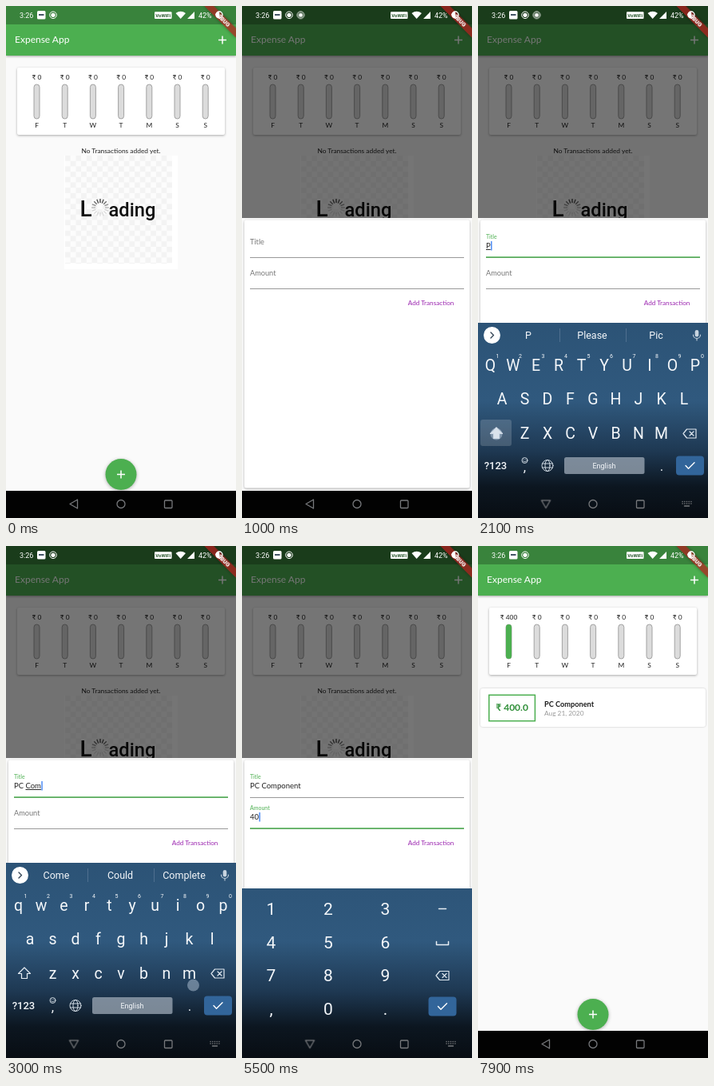
Write an HTML page that moves like this. It is 288 px wide and 640 px high and loops after 8 s.

```html
<!DOCTYPE html>
<html lang="en">
<head>
<meta charset="utf-8">
<title>Expense App</title>
<style>
  html, body { margin: 0; width: 100%; height: 100%; overflow: hidden; background: #000; }
  svg { display: block; width: 288px; height: 640px; font-family: Lato, "Open Sans", sans-serif; }
  text { white-space: pre; }
  .mid { text-anchor: middle; }
  .sys { font-family: Roboto, "Noto Sans", sans-serif; }
  .line { fill: none; stroke-linecap: round; stroke-linejoin: round; }
  .card { fill: #fff; filter: drop-shadow(0 1px 1.5px rgba(0,0,0,.32)); }
  .flat { filter: drop-shadow(0 .6px .8px rgba(0,0,0,.22)); }
  .small { font-size: 8.4px; fill: #222; }
  .input { font-size: 9.5px; fill: #222; }
  .label { font-size: 9.2px; fill: #777; }
  .upper .letter { text-transform: uppercase; }
  #word { text-decoration: underline #aaa .6px; }

  #scrim, #sheet, #empty, #filled, #alpha, #digits, #back, #imeIcon, #second,
  .label, .focus { animation: 8s linear infinite; }

  #scrim { animation-name: scrim; }
  @keyframes scrim {
    0%, 4.375% { opacity: 0; animation-timing-function: ease; }
    7.5%, 79.375% { opacity: .54; }
    82%, 100% { opacity: 0; }
  }
  #sheet { animation-name: sheet; }
  @keyframes sheet {
    0%, 4.375% { transform: translateY(341px); animation-timing-function: cubic-bezier(0,0,.2,1); }
    7.5%, 79.375% { transform: none; animation-timing-function: cubic-bezier(.8,0,1,1); }
    82%, 100% { transform: translateY(341px); }
  }
  #empty { animation-name: before; }
  @keyframes before { 0%, 79.37% { opacity: 1; } 79.375%, 100% { opacity: 0; } }
  #filled { animation-name: after; }
  @keyframes after { 0%, 79.37% { opacity: 0; } 79.375%, 100% { opacity: 1; } }
  #second { animation-name: second; }
  @keyframes second {
    0%, 9.99% { opacity: 0; }
    10%, 36.99% { opacity: 1; }
    37%, 100% { opacity: 0; }
  }
  #alpha { animation-name: alpha; }
  @keyframes alpha {
    0%, 17.5% { transform: translateY(244px); animation-timing-function: cubic-bezier(0,0,.2,1); }
    20.625%, 54.49% { transform: none; }
    54.5%, 100% { transform: translateY(244px); }
  }
  #digits { animation-name: digits, fade; }
  @keyframes digits {
    0%, 54.49% { transform: translateY(244px); }
    54.5%, 82.22% { transform: none; animation-timing-function: cubic-bezier(.4,0,1,1); }
    85.25%, 100% { transform: translateY(244px); }
  }
  @keyframes fade {
    0%, 82.05% { opacity: 1; }
    82.45% { opacity: .93; }
    85.25%, 100% { opacity: .6; }
  }
  #back { animation-name: turn; transform-origin: 85px 622.5px; }
  @keyframes turn {
    0%, 17.5% { transform: none; }
    19.75%, 82% { transform: rotate(-90deg); }
    82.9%, 100% { transform: none; }
  }
  #imeIcon { animation-name: ime; }
  @keyframes ime {
    0%, 17.5% { opacity: 0; }
    19.75%, 82% { opacity: 1; }
    82.4%, 100% { opacity: 0; }
  }
  #titleLabel { animation-name: titleLabel; transform-origin: 10px 298px; }
  @keyframes titleLabel {
    0%, 16.25% { transform: none; fill: #777; }
    18.75%, 100% { transform: translateY(-7px) scale(.76); fill: #4caf50; }
  }
  #amountLabel { animation-name: amountLabel; transform-origin: 10px 337px; }
  @keyframes amountLabel {
    0%, 52.875% { transform: none; fill: #777; }
    55.375%, 100% { transform: translateY(-7px) scale(.76); fill: #4caf50; }
  }
  #titleFocus { animation-name: titleFocus; }
  @keyframes titleFocus {
    0%, 16.25% { opacity: 0; }
    18.75%, 52.875% { opacity: 1; }
    55.375%, 100% { opacity: 0; }
  }
  #amountFocus { animation-name: amountFocus; }
  @keyframes amountFocus {
    0%, 52.875% { opacity: 0; }
    55.375%, 100% { opacity: 1; }
  }
</style>
</head>
<body>
<svg viewBox="0 0 288 640">
  <defs>
    <linearGradient id="keys" gradientUnits="userSpaceOnUse" x1="0" y1="396" x2="0" y2="640">
      <stop offset="0" stop-color="#2c5376"/>
      <stop offset=".4" stop-color="#30597e"/>
      <stop offset=".66" stop-color="#1e3852"/>
      <stop offset=".84" stop-color="#0c1620"/>
      <stop offset="1" stop-color="#080d13"/>
    </linearGradient>
    <pattern id="checks" x="74" y="187" width="13.4" height="13.4" patternUnits="userSpaceOnUse">
      <rect width="13.4" height="13.4" fill="#fcfcfc"/>
      <path d="M0 0h6.7v13.4h6.7v-6.7h-13.4z" fill="#f3f3f3"/>
    </pattern>
    <g id="erase" class="line" stroke="#dfe8f0" stroke-width="1.2">
      <path d="M-8 0L-3.5 -5.5H8V5.5H-3.5ZM0 -2.5L5 2.5M5 -2.5L0 2.5"/>
    </g>
    <g id="enter">
      <rect x="-17.5" y="-12" width="35" height="24" rx="4" fill="#32659a"/>
      <path class="line" d="M-5.5 0L-2 3.7L5.5 -3.7" stroke="#fff" stroke-width="1.4"/>
    </g>
    <g id="record">
      <circle r="4.3" fill="none" stroke="#fff"/>
      <circle r="2.6" fill="#fff"/>
    </g>
  </defs>

  <rect width="288" height="640" fill="#fafafa"/>
  <rect width="288" height="62" fill="#4caf50" style="filter:drop-shadow(0 1px 1.5px rgba(0,0,0,.35))"/>
  <rect width="288" height="23" fill="#39833c"/>
  <text x="11" y="46" font-size="12" fill="#fff">Expense App</text>
  <path d="M266 42.5h10M271 37.5v10" stroke="#fff" stroke-width="1.5"/>

  <rect class="card" x="14" y="77" width="260" height="84" rx="2"/>
  <g id="days"></g>

  <g id="empty">
    <text class="small mid" x="38.5" y="92">₹ 0</text>
    <text class="small mid" x="144" y="184">No Transactions added yet.</text>
    <rect x="73" y="187" width="142" height="142" fill="#fff"/>
    <rect x="74" y="187" width="134" height="135" fill="url(#checks)"/>
    <g class="sys" font-weight="500" fill="#111">
      <text x="92.5" y="263" font-size="28">L</text>
      <text x="128.5" y="263" font-size="23.7">ading</text>
    </g>
    <g id="spinner" stroke="#222" stroke-width="1.3"></g>
  </g>

  <g id="filled">
    <rect x="35" y="98" width="7" height="43" rx="3.5" fill="#4caf50"/>
    <text class="small mid" x="38.5" y="92">₹ 400</text>
    <rect class="card flat" x="3" y="178" width="282" height="48" rx="3"/>
    <rect x="13.8" y="186.3" width="57.6" height="32.4" fill="none" stroke="#4caf50" stroke-width="1.5"/>
    <text class="mid" x="42.6" y="206" font-size="12" font-weight="700" fill="#2f8f38">₹ 400.0</text>
    <text x="83" y="201" font-size="9.2" font-weight="700" fill="#1c1c1c">PC Component</text>
    <text x="83" y="212" font-size="8.3" fill="#999">Aug 21, 2020</text>
  </g>

  <circle cx="144" cy="585.5" r="19.5" fill="#4caf50" style="filter:drop-shadow(0 1.5px 2px rgba(0,0,0,.3))"/>
  <path d="M139 585.5h10M144 580.5v10" stroke="#fff" stroke-width="1.5"/>

  <rect id="scrim" width="288" height="606"/>

  <g id="sheet">
    <rect y="265" width="288" height="341" fill="#fafafa"/>
    <rect class="card" x="3" y="267.5" width="282" height="335" rx="2.5"/>
    <path d="M10 314.5h268M10 353.5h268" stroke="#999"/>
    <path id="titleFocus" class="focus" d="M10 314h268" stroke="#4caf50" stroke-width="1.6"/>
    <path id="amountFocus" class="focus" d="M10 353h268" stroke="#4caf50" stroke-width="1.6"/>
    <text id="titleLabel" class="label" x="10" y="298">Title</text>
    <text id="amountLabel" class="label" x="10" y="337">Amount</text>
    <text id="title" class="input" x="10" y="303"><tspan id="done"></tspan><tspan id="word"></tspan></text>
    <text id="amount" class="input" x="10" y="342"></text>
    <rect id="caret" width="1.4" height="11.5" fill="#4285f4"/>
    <text x="207.7" y="374" font-size="8.2" fill="#9c27b0">Add Transaction</text>
  </g>

  <g transform="translate(288) rotate(45)">
    <rect x="-28" y="19.6" width="56" height="8.4" fill="#b71c1c" opacity=".7" style="filter:drop-shadow(0 0 2px rgba(0,0,0,.5))"/>
    <text class="mid sys" y="26.3" font-size="7.1" font-weight="900" fill="#fff">DEBUG</text>
  </g>

  <g class="sys" fill="#fff" font-size="9">
    <text x="17" y="14.5">3:26</text>
    <rect x="39" y="6" width="10.5" height="10.5" rx="1.5"/>
    <path d="M41 11h6.5" stroke="#456" stroke-width="2"/>
    <use href="#record" x="59" y="11.3"/>
    <use id="second" href="#record" x="73.5" y="11.3"/>
    <rect x="186" y="7.2" width="21.5" height="8.8" rx="1"/>
    <text class="mid" x="196.7" y="13.7" font-size="6" font-weight="700" fill="#2c5b30">VoWiFi</text>
    <path d="M212.5 9Q218.7 4.5 225 9L218.7 16ZM227 16L236 7V16Z"/>
    <text x="241" y="14.5">42%</text>
    <circle cx="267" cy="11" r="4" fill="none" stroke="#fff" stroke-width="1.4"/>
    <path d="M267 7a4 4 0 0 0 0 8z"/>
  </g>

  <rect y="606" width="288" height="34" fill="#020202"/>

  <g id="alpha" class="sys" fill="#f4f7fa">
    <rect y="396" width="288" height="244" fill="url(#keys)"/>
    <circle cx="17.5" cy="411.5" r="10.5" fill="#fff"/>
    <path class="line" d="M16 408l3.5 3.5l-3.5 3.5" stroke="#345" stroke-width="1.4"/>
    <path d="M102.5 403v17M185.5 403v17" stroke="#587796" stroke-width=".8"/>
    <g id="hints"></g>
    <rect x="271.7" y="405" width="4.6" height="8.5" rx="2.3" fill="#c8d4e0"/>
    <path class="line" d="M269.5 411a4.5 4.5 0 0 0 9 0M274 415.5v2.5" stroke="#c8d4e0" stroke-width="1.1"/>
    <g id="letters"></g>
    <rect id="shiftBack" x="3" y="517" width="39" height="33" rx="3" fill="#fff" opacity=".17"/>
    <path id="shift" class="line" d="M23 527l7.5 7.5h-4v6h-7v-6h-4z" stroke="#e6edf4" stroke-width="1.2"/>
    <use href="#erase" x="265" y="534.5"/>
    <text class="mid" x="22" y="579" font-size="13" font-weight="500">?123</text>
    <text class="mid" x="58.5" y="582" font-size="17">,</text>
    <g class="line" stroke="#dfe8f0" stroke-width=".9">
      <circle cx="58.5" cy="568" r="3.5"/>
      <path d="M56.7 569q1.8 2 3.6 0M57.3 566.7h.1M59.7 566.7h.1"/>
      <circle cx="87" cy="574.5" r="7"/>
      <ellipse cx="87" cy="574.5" rx="3" ry="7"/>
      <path d="M80.7 572h12.6M80.7 577h12.6"/>
    </g>
    <rect x="108" y="564" width="100.5" height="21" rx="2.5" fill="#95a2b0" opacity=".8"/>
    <text class="mid" x="158" y="578" font-size="9">English</text>
    <text class="mid" x="230" y="581" font-size="17">.</text>
    <use href="#enter" x="265.5" y="574.5"/>
  </g>

  <g id="digits" class="sys" fill="#f4f7fa">
    <rect y="428" width="288" height="212" fill="url(#keys)"/>
    <g id="pad" font-size="21"></g>
    <path class="line" d="M246.5 453.5h9M243.5 494.5v4h15v-4" stroke="#e6edf4" stroke-width="1.5"/>
    <use href="#erase" x="251" y="537"/>
    <use href="#enter" x="251" y="575.5"/>
  </g>

  <g class="line" stroke="#77797c" stroke-width="1.3">
    <path id="back" d="M80 622.5l9.5 -5.5v11z"/>
    <circle cx="144" cy="622.5" r="5"/>
    <rect x="198.5" y="618" width="9.5" height="9.5" rx="1"/>
    <g id="imeIcon" stroke-width="1.4">
      <path d="M256 619.5h11M256 622h11" stroke-dasharray=".2 2.5"/>
      <path d="M258.5 625h6"/>
    </g>
  </g>
  <circle id="touch" r="7.5" fill="#b4c6d8" opacity=".5"/>
</svg>
<script>
  const $ = id => document.getElementById(id);
  const add = (parent, tag, attrs, text = '') => {
    const el = document.createElementNS('http://www.w3.org/2000/svg', tag);
    for (const name in attrs) el.setAttribute(name, attrs[name]);
    el.textContent = text;
    return parent.appendChild(el);
  };

  [...'FTWTMSS'].forEach((day, i) => {
    const x = 38.5 + 35.2 * i;
    add($('days'), 'rect', { x: x - 3.5, y: 98, width: 7, height: 43, rx: 3.5, fill: '#dcdcdc', stroke: '#9a9a9a', 'stroke-width': .9 });
    add($('days'), 'text', { class: 'small mid', x, y: 152 }, day);
    if (i) add($('days'), 'text', { class: 'small mid', x, y: 92 }, '₹ 0');
  });

  for (let deg = 0; deg < 360; deg += 22.5) {
    const shade = (1 + Math.cos(deg * Math.PI / 180)) / 2;
    add($('spinner'), 'path', { d: 'M0 -6v-5', transform: `translate(118 252) rotate(${deg})`, opacity: .12 + .75 * shade ** 2 });
  }

  const spots = { '^': [23, 535], ' ': [158, 575] };
  const rows = [['qwertyuiop', 15.5, 448.5], ['asdfghjkl', 30, 491], ['zxcvbnm', 58.5, 534]];
  rows.forEach(([row, left, y], r) => [...row].forEach((key, i) => {
    const x = left + 28.5 * i;
    spots[key] = [x + 5, y + 15];
    add($('letters'), 'text', { class: 'letter mid', x, y: y + 7, 'font-size': 19.5 }, key);
    if (!r) add($('letters'), 'text', { class: 'mid', x: x + 9, y: 440, 'font-size': 7 }, (i + 1) % 10);
  }));

  ['123', '456', '789', ',0.'].forEach((row, r) => [...row].forEach((key, i) =>
    add($('pad'), 'text', { class: 'mid', x: 36.5 + 71.5 * i, y: 461 + 41.6 * r }, key)));

  const hints = [63, 143, 223].map(x => add($('hints'), 'text', { class: 'mid', x, y: 416.4 }));

  // "^" is a press of the shift key
  const strokes = 'P^C ^Component', typeStart = 1930, typeStep = 150;
  const titleFocus = 1300, amountFocus = 4230;
  const amountTimes = [4900, 5300, 5650];
  const taps = [
    [200, 144, 586], [1240, 60, 302], [4170, 60, 338],
    [4900, 36.5, 495], [5300, 108, 578], [5650, 108, 578], [6320, 251, 576]
  ];
  [...strokes].forEach((key, i) =>
    taps.push([typeStart + typeStep * i, ...spots[key.toLowerCase()]]));

  function suggest(typed, word) {
    if (!typed) return ['I', 'The', 'You'];
    if (!word) return ['and', 'is', 'for'];
    if (word === 'P') return ['P', 'Please', 'Pic'];
    if (word === 'PC') return ['PC', 'PCs', 'Pc'];
    if (word === 'C') return ['C', 'Can', 'Call'];
    if (word.length < 5) return ['Come', 'Could', 'Complete'];
    return ['Component', 'Components', 'Componentry'];
  }

  function draw(t) {
    const count = Math.max(0, Math.min(strokes.length, Math.floor((t - typeStart) / typeStep) + 1));
    const pressed = strokes.slice(0, count), typed = pressed.replace(/\^/g, '');
    const word = typed.split(' ').pop();
    const onAmount = t >= amountFocus;

    $('done').textContent = typed.slice(0, typed.length - word.length);
    $('word').textContent = word;
    $('word').style.textDecorationLine = onAmount ? 'none' : 'underline';
    const entered = amountTimes.filter(time => t >= time);
    $('amount').textContent = '400'.slice(0, entered.length);

    const field = $(onAmount ? 'amount' : 'title');
    const last = onAmount ? entered.pop() || amountFocus : count ? typeStart + typeStep * (count - 1) : titleFocus;
    $('caret').setAttribute('x', 10.4 + field.getComputedTextLength());
    $('caret').setAttribute('y', onAmount ? 333 : 294);
    $('caret').style.opacity = t >= titleFocus && (t - last) % 1000 < 500 ? 1 : 0;

    const shifted = pressed.endsWith('^');
    const upper = !count || shifted;
    $('letters').classList.toggle('upper', upper);
    $('shift').style.fill = upper ? '#fff' : 'none';
    $('shiftBack').style.opacity = shifted ? .17 : 0;
    suggest(typed, word).forEach((text, i) => {
      hints[i].textContent = text;
      hints[i].style.fontSize = text.length > 10 ? '11px' : '12.5px';
    });

    const tap = taps.find(([time]) => t >= time && t < time + 110);
    $('touch').style.display = tap ? '' : 'none';
    if (tap) $('touch').setAttribute('transform', `translate(${tap[1]} ${tap[2]})`);
  }

  // Typing follows the same clock as the CSS motion.
  const clock = $('scrim').getAnimations()[0];
  function frame() {
    draw((clock.currentTime || 0) % 8000);
    requestAnimationFrame(frame);
  }
  frame();
</script>
</body>
</html>
```
